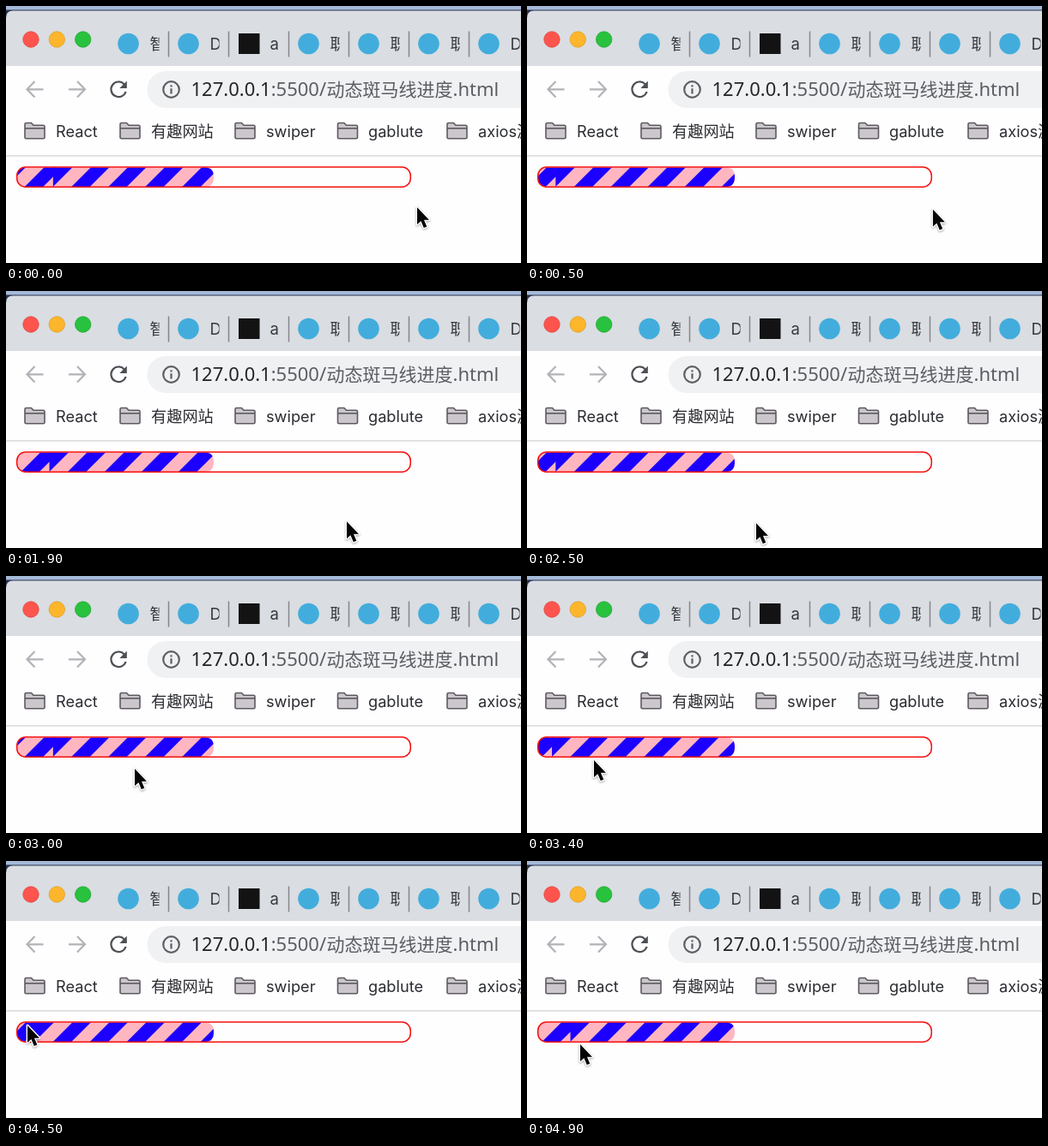
Recreate the animation shown at these times as an HTML page. Size 600x300 px, loop 5 s.

```html
<!DOCTYPE html>
<html lang="zh">
<head>
<meta charset="utf-8">
<title>Striped progress</title>
<style>
  html, body { margin: 0; width: 100%; height: 100%; overflow: hidden; background: #fefdff; }
  svg { display: block; width: 600px; height: 300px; }
  text { font-family: Inter, "Noto Sans CJK SC", "Noto Sans CJK", sans-serif; white-space: pre; }
  .tab { font-size: 18.5px; fill: #36393d; }
  .url { font-family: "Noto Sans", "Noto Sans CJK SC", "Noto Sans CJK", sans-serif; font-size: 22px; fill: #5a5d62; }
  .mark { font-size: 18.2px; fill: #2b2d31; }
  .icon { fill: none; stroke-width: 2.2; }
  #cursor { filter: drop-shadow(0 1px 1px rgba(0, 0, 0, .35)); }
</style>
</head>
<body>
<svg viewBox="0 0 600 300">
  <defs>
    <clipPath id="bar"><path d="M23 188.5H232Q242 188.5 242 199.7T232 211H23Q13 211 13 199.7T23 188.5Z"/></clipPath>
    <clipPath id="after"><rect y="-2" width="260" height="26"/></clipPath>
    <clipPath id="before"><rect x="-60" y="-2" width="60.6" height="26"/></clipPath>
    <g id="folder" stroke="#5d5a5f" stroke-width="1.6" stroke-linejoin="round">
      <path d="M1 18V2.5Q1 1 2.5 1H8.5L11 3.8H22.5Q24 3.8 24 5.3V18Q24 19.2 22.5 19.2H2.5Q1 19.2 1 18Z" fill="#cbc7cc"/>
      <path d="M1 7.3H24"/>
    </g>
  </defs>

  <rect width="600" height="300" fill="#fefdff"/>
  <rect width="600" height="12" fill="#a5b9d9"/>
  <path d="M0 4.4H600V14H0Z" fill="#2b3450"/>
  <path d="M0 14Q0 5.4 8 5.4H600V70H0Z" fill="#dadde2"/>
  <g stroke-width=".8">
    <circle cx="29" cy="39" r="9.2" fill="#fe544e" stroke="#e0443e"/>
    <circle cx="59.3" cy="39" r="9.2" fill="#fdb52b" stroke="#dea123"/>
    <circle cx="89.7" cy="39" r="9.2" fill="#28c23e" stroke="#1faa31"/>
  </g>
  <g id="tabs"></g>

  <rect y="70" width="600" height="104.5" fill="#fefdff"/>
  <path d="M0 174.8H600" stroke="#d3d3d6" stroke-width="1.3"/>
  <g class="icon" stroke="#b1b3b6">
    <path d="M43.5 97.3H25M33.5 88L24.5 97.3L33.5 106.6"/>
    <path d="M73 97.3H91.5M83 88L92 97.3L83 106.6"/>
  </g>
  <path class="icon" stroke="#4c4f53" d="M137.6 91.2A8.8 8.8 0 1 0 139.6 100"/>
  <path d="M140.8 87.5V96H132.3Z" fill="#4c4f53"/>
  <rect x="164.5" y="76" width="480" height="43" rx="21.5" fill="#f0f1f3"/>
  <circle class="icon" cx="192.5" cy="97.5" r="9.3" stroke="#5c6064"/>
  <path class="icon" stroke="#5c6064" d="M192.5 96.3V102.4M192.5 92.3V94.5"/>
  <text class="url" x="215.5" y="105"><tspan fill="#222427">127.0.0.1</tspan>:5500/</text>
  <text class="url" x="373.5" y="105" style="font-size:21px">动态斑马线进度</text>
  <text class="url" x="520.5" y="105">.html</text>
  <g id="marks"></g>

  <g clip-path="url(#bar)">
    <rect x="12" y="188" width="231" height="24" fill="#ffb6c1"/>
    <g id="stripes" fill="#1c00ff">
      <g id="right" clip-path="url(#after)"></g>
      <g id="left" clip-path="url(#before)"></g>
    </g>
  </g>
  <rect x="12.7" y="188" width="458.6" height="23.2" rx="10" fill="none" stroke="#f5100c" stroke-width="1.5"/>

  <path id="cursor" d="M0 0V20L4.4 16L7.8 24L11.3 22.5L8 14.7H14Z"
    fill="#050505" stroke="#fff" stroke-width="2.8" stroke-linejoin="round" paint-order="stroke"/>
</svg>
<script>
const byId = id => document.getElementById(id);
const PERIOD = 43, HALF = PERIOD / 2, LOOP = 5000, STEP = 100;

// Tab strip: icon, clipped title and divider every 70 px
byId('tabs').innerHTML = [...'智Da职职职D'].map((title, i) => {
  const x = 142.5 + 70 * i;
  const icon = i === 2
    ? `<rect x="${x - 11.5}" y="32" width="24.5" height="24" fill="#131313"/>`
    : `<circle cx="${x}" cy="44" r="12.3" fill="#42addc"/>`;
  return `${icon}<svg x="${x + 25}" y="30" width="11" height="30">
    <text class="tab" x="0" y="20.5">${title}</text></svg>
    <path d="M${x + 47} 29.5V59.5" stroke="#85878c" stroke-width="1.5"/>`;
}).join('');

byId('marks').innerHTML = [
  [21, 58, 'React'], [132, 169, '有趣网站'], [266, 303, 'swiper'],
  [385.5, 422, 'gablute'], [513, 550, 'axios源']
].map(([icon, x, label]) =>
  `<use href="#folder" x="${icon}" y="135.5"/><text class="mark" x="${x}" y="152.5">${label}</text>`
).join('');

// Slanted bands; the tile does not divide evenly, so a seam shows between the two parts
const bands = (from, count) => Array.from({length: count}, (_, i) => {
  const x = from + i * PERIOD;
  return `<path d="M${x + 2} -2h${HALF}l-26 26h${-HALF}Z"/>`;
}).join('');
byId('right').innerHTML = `<path d="M0 -2H4L0 2Z"/>` + bands(0, 7);
byId('left').innerHTML = bands(-11.5 - PERIOD, 2);

// Pointer path: time, x, y
const path = [
  [0, 479, 234], [600, 471, 237], [1100, 455, 239], [1500, 439, 242], [1800, 411, 249],
  [1900, 397, 268], [2200, 338, 283], [2500, 267, 270], [3000, 150, 224], [3400, 78, 214],
  [3800, 39, 204], [4200, 26, 194], [4500, 25, 191], [4800, 47, 204], [4900, 62, 213]
];

function slope(i, axis) {
  const a = path[Math.max(i - 1, 0)], b = path[Math.min(i + 1, path.length - 1)];
  return (b[axis] - a[axis]) / (b[0] - a[0]);
}

function pointer(t, axis) {
  let i = 0;
  while (i < path.length - 2 && t >= path[i + 1][0]) i++;
  const a = path[i], b = path[i + 1], span = b[0] - a[0];
  const u = Math.min((t - a[0]) / span, 1), v = 1 - u;
  return v * v * (1 + 2 * u) * a[axis] + u * u * (3 - 2 * u) * b[axis]
    + span * u * v * (v * slope(i, axis) - u * slope(i + 1, axis));
}

function draw(now) {
  const t = Math.floor((now % LOOP) / STEP) * STEP;
  const shift = PERIOD * ((t / 1000 + 0.985) % 1);
  byId('stripes').setAttribute('transform', `translate(${12.5 + shift} 189.4)`);
  byId('cursor').setAttribute('transform', `translate(${pointer(t, 1)} ${pointer(t, 2) + 1})`);
}

const start = performance.now();
function tick() {
  draw(performance.now() - start);
  requestAnimationFrame(tick);
}
tick();
</script>
</body>
</html>
```
